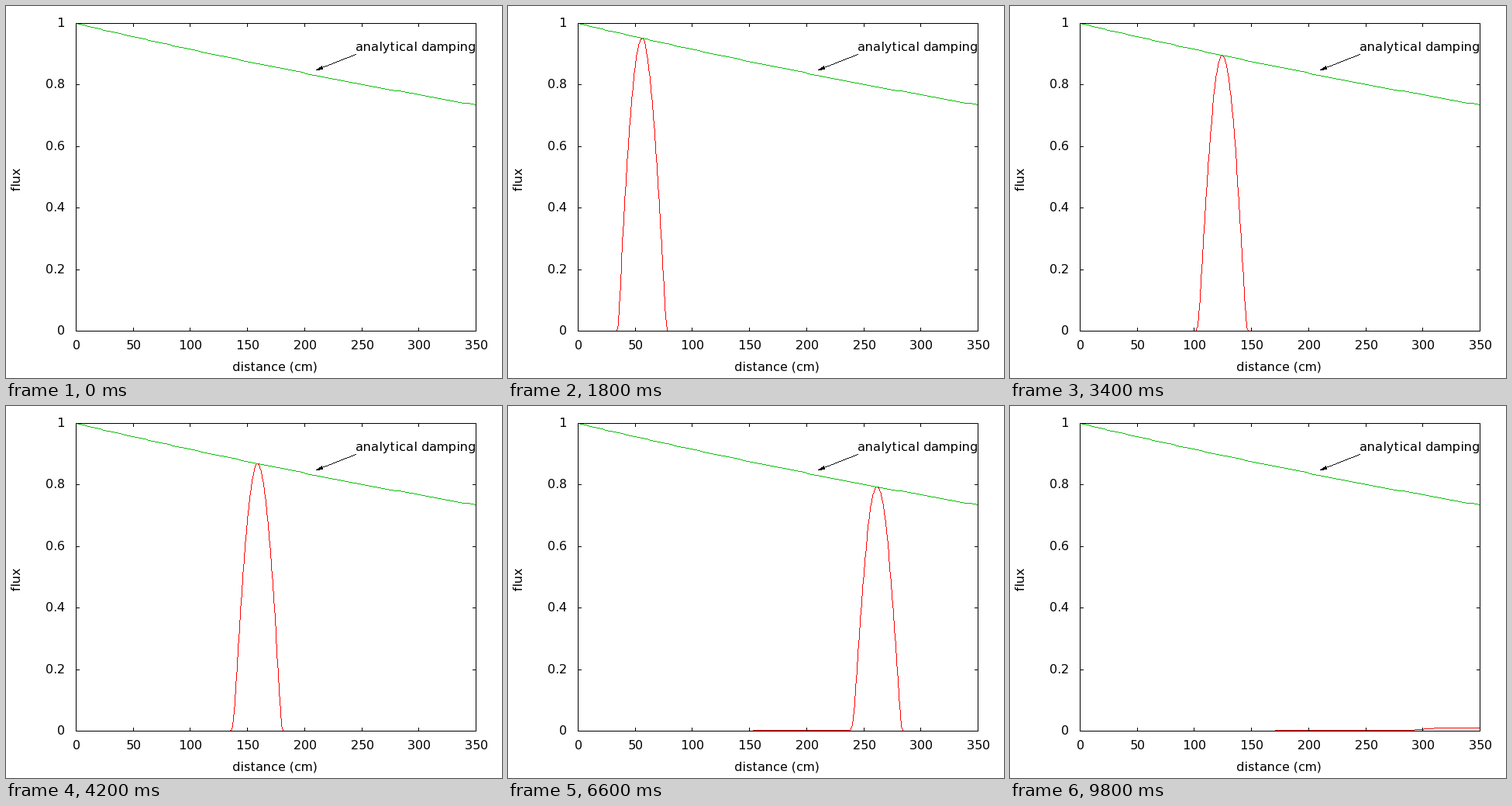
These frames come from a looping animation (640x480 px, 10 s). A matplotlib script:

```python
import numpy as np
import matplotlib.pyplot as plt
from matplotlib.animation import FuncAnimation

W, H, DPI = 640, 480, 80
LEFT, RIGHT, TOP, BOTTOM = 90, 606, 22, 419
X_MAX = 350
SCALE = (RIGHT - LEFT) / X_MAX     # pixels per cm
TICK = 4

FRAMES, INTERVAL = 50, 200
DAMPING = 0.00088                  # per cm
SPEED = 8.575                      # cm per frame
HALF_WIDTH = 21.1                  # cm
RESIDUE, ECHO = 0.002, 0.0086

BLACK, RED, GREEN = (0, 0, 0), (255, 0, 0), (0, 192, 0)

plt.rcParams["font.family"] = "DejaVu Sans"
plt.rcParams["font.size"] = 16 * 72 / DPI
plt.rcParams["text.hinting_factor"] = 1

fig = plt.figure(figsize=(W / DPI, H / DPI), dpi=DPI, facecolor="white")
ax = fig.add_axes([0, 0, 1, 1], zorder=2)
ax.set_xlim(-0.5, W - 0.5)
ax.set_ylim(H - 0.5, -0.5)
ax.axis("off")

base = np.full((H, W, 3), 255, np.uint8)


def to_px(x, y):
    """Data coordinates to whole pixels."""
    px = LEFT + np.asarray(x) * SCALE
    py = BOTTOM - np.asarray(y) * (BOTTOM - TOP)
    return np.floor(px + 0.5), np.floor(py + 0.5)


def trace(sheet, xs, ys, color):
    """One-pixel polyline without smoothing."""
    for x0, y0, x1, y1 in zip(xs[:-1], ys[:-1], xs[1:], ys[1:]):
        n = int(np.ceil(max(abs(x1 - x0), abs(y1 - y0)))) + 1
        cols = np.floor(np.linspace(x0, x1, n) + 0.5).astype(int)
        rows = np.floor(np.linspace(y0, y1, n) + 0.5).astype(int)
        sheet[rows, cols] = color


def label(x, y, text, ha="center", **kw):
    ax.text(x, y, text, ha=ha, va="baseline", color="black", **kw)


def draw_axes():
    trace(base, [LEFT, RIGHT, RIGHT, LEFT, LEFT],
          [TOP, TOP, BOTTOM, BOTTOM, TOP], BLACK)
    for v in range(0, X_MAX + 1, 50):
        x, _ = to_px(v, 0)
        trace(base, [x, x], [BOTTOM, BOTTOM - TICK], BLACK)
        trace(base, [x, x], [TOP, TOP + TICK], BLACK)
        label(x + 0.5, 442.5, str(v))
    for i in range(6):
        v = i / 5
        _, y = to_px(0, v)
        trace(base, [LEFT, LEFT + TICK], [y, y], BLACK)
        trace(base, [RIGHT, RIGHT - TICK], [y, y], BLACK)
        label(75.5, y + 4.5, f"{v:g}", ha="right")
    label(346.5, 470, "distance (cm)")
    label(17.5, 223, "flux", rotation=90, rotation_mode="anchor")


def draw_note():
    label(450.5, 57.5, "analytical damping", ha="left")
    tail = np.array(to_px(245, 0.9))
    tip = np.array(to_px(210, 0.85))
    trace(base, *zip(tail, tip), BLACK)
    u = (tip - tail) / np.hypot(*(tip - tail))
    side = np.array([-u[1], u[0]])
    for offset in np.linspace(-2, 2, 9):
        trace(base, *zip(tip, tip - 8 * u + offset * side), BLACK)


def flux(x, frame):
    """Damped pulse, the faint residue behind it and its echo off the far end."""
    peak = 56 + SPEED * (frame - 9)
    arc = np.cos(np.pi / 2 * np.clip((x - peak) / HALF_WIDTH, -2, 2))
    # the trailing foot spreads as the pulse travels
    soft = np.where(x < peak, np.clip(0.003 * frame, 0.01, 0.06), 0.03)
    y = soft * np.log1p(np.exp(arc / soft)) * np.exp(-DAMPING * x)

    start = (211 + 1.6 * (frame - 24)) / SCALE
    y += np.where((x >= start) & (x < peak - HALF_WIDTH), RESIDUE, 0)

    back = np.clip((x - (2 * X_MAX - peak)) / HALF_WIDTH, -1, 1)
    return y + ECHO * (1 + np.sin(np.pi / 2 * back)) / 2


samples = np.linspace(0, X_MAX, 100)
trace(base, *to_px(samples, np.exp(-DAMPING * samples)), GREEN)
draw_axes()
draw_note()
inked = (base < 255).any(axis=2)

grid = np.linspace(0, X_MAX, X_MAX + 1)
picture = fig.figimage(base, origin="upper", zorder=1)


def update(frame):
    sheet = np.full_like(base, 255)
    if frame:
        trace(sheet, *to_px(grid, flux(grid, frame)), RED)
    sheet[inked] = base[inked]
    picture.set_data(sheet)
    return picture,


anim = FuncAnimation(fig, update, frames=FRAMES, interval=INTERVAL,
                     init_func=lambda: update(0), repeat=True, repeat_delay=0)
plt.show()
```
